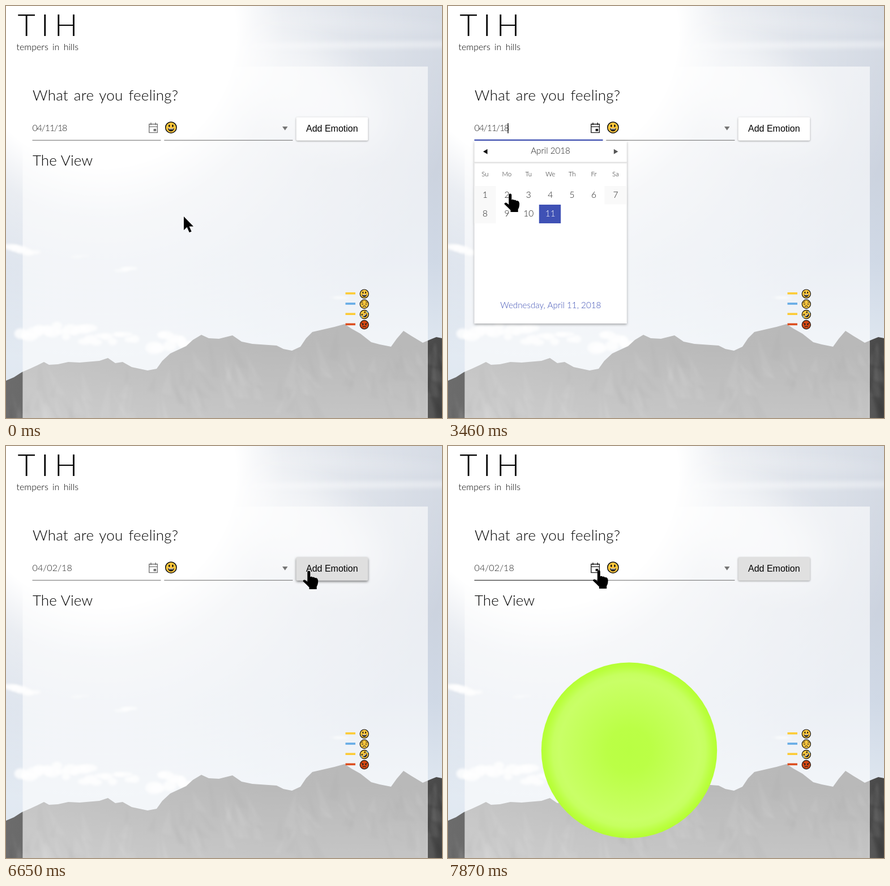
Animation of 770x728 px, one loop 8000 ms. Source, as an HTML page with a canvas:

```html
<!DOCTYPE html>
<html lang="en">
<head>
<meta charset="utf-8">
<title>Mood diary</title>
<style>
  html, body { margin: 0; width: 100%; height: 100%; overflow: hidden; background: #fff; }
  canvas, svg.ui { position: absolute; left: 0; top: 0; width: 770px; height: 728px; }
  text { font-family: Lato, sans-serif; font-weight: 300; fill: #000; }
  .mid { text-anchor: middle; }
  .sans { font-family: "Liberation Sans", Arial, sans-serif; font-weight: 400; font-size: 16px; }
  .soft { fill: #222; }
  #popup.raised { filter: drop-shadow(0 2px 2px rgba(0,0,0,.32)); }
  #btn { filter: drop-shadow(0 1.5px 1.5px rgba(0,0,0,.36)); }
  #btn.down { filter: drop-shadow(0 2px 2px rgba(0,0,0,.5)); }
</style>
</head>
<body>
<canvas id="bg" width="770" height="728"></canvas>
<svg class="ui" viewBox="0 0 770 728">
  <defs>
    <radialGradient id="lime">
      <stop offset="0" stop-color="#b9ff43"/>
      <stop offset=".25" stop-color="#bbff46"/>
      <stop offset=".8" stop-color="#c9ff67"/>
      <stop offset=".87" stop-color="#c6ff60"/>
      <stop offset=".96" stop-color="#b9ff3b"/>
      <stop offset="1" stop-color="#b5ff34"/>
    </radialGradient>
    <g id="face">
      <circle r="9.5" fill="#ffc83d" stroke="#111" stroke-width="1.5"/>
    </g>
    <g id="happy">
      <use href="#face"/>
      <ellipse cx="-3" cy="-3" rx="1.3" ry="2.2" fill="#111"/>
      <ellipse cx="3" cy="-3" rx="1.3" ry="2.2" fill="#111"/>
      <path d="M-5.4 1.4H5.4A5.4 5.2 0 0 1-5.4 1.4Z" fill="#222"/>
      <path d="M-4.2 1.8H4.2L3.6 3H-3.6Z" fill="#fff"/>
    </g>
    <g id="weary" fill="none" stroke="#222" stroke-width="1.4">
      <use href="#face"/>
      <path d="M-7-3.6L-2.5-5.5M7-3.6L2.5-5.5M-6-.8Q-4 1-2-.8M6-.8Q4 1 2-.8M-3.5 5.8Q0 1.5 3.5 5.8"/>
    </g>
    <g id="rofl" transform="rotate(-40)">
      <use href="#face"/>
      <path d="M-6-4.6L-2.6-3L-6-1.4M6-4.6L2.6-3L6-1.4" fill="none" stroke="#222" stroke-width="1.4"/>
      <path d="M-5.4 1H5.4A5.4 5.4 0 0 1-5.4 1Z" fill="#222"/>
      <path d="M-4.2 1.3H4.2L3.6 2.8H-3.6Z" fill="#fff"/>
      <path d="M-8-2L-9 2M8-2L9 2" stroke="#5bb8f0" stroke-width="2"/>
    </g>
    <g id="angry">
      <circle r="9.5" fill="#da4a14" stroke="#111" stroke-width="1.5"/>
      <path d="M-6.5-4L-1.5-1.5M6.5-4L1.5-1.5M-4 5.5Q0 2 4 5.5" fill="none" stroke="#222" stroke-width="1.6"/>
      <circle cx="-3.4" cy="0" r="1.4" fill="#222"/><circle cx="3.4" cy="0" r="1.4" fill="#222"/>
    </g>
  </defs>

  <text x="20.5" y="53" font-size="54" letter-spacing="10">TIH</text>
  <text x="18.5" y="77.5" font-size="16" word-spacing="3">tempers in hills</text>
  <text x="47" y="167" font-size="26" letter-spacing=".25" word-spacing="2.5">What are you feeling?</text>
  <text x="47" y="282" font-size="26" word-spacing="1">The View</text>

  <circle id="ball" cx="320" cy="537.8" fill="url(#lime)"/>
  <g id="legend"></g>

  <text id="date" class="soft" x="46.5" y="221" font-size="16"></text>
  <rect id="caret" y="207" width="1.4" height="18" fill="#111"/>
  <g id="icon" fill="none" stroke-width="1.4">
    <path d="M252.8 208.8H267.4V223.6H252.8ZM252.8 213.4H267.4M256 206V210.5M264.2 206V210.5"/>
    <rect class="dot" x="260.6" y="217" width="4.6" height="4.2" stroke="none"/>
  </g>
  <rect id="line1" x="46.5" width="227"/>
  <rect id="line2" x="279.3" y="236.7" width="227.2" height="1.1"/>
  <path id="drop" d="M488 213H497.5L492.75 219.8Z"/>
  <use href="#happy" transform="translate(291.4 214.7) scale(1.02)"/>

  <rect id="btn" x="512.5" y="196.5" width="126.8" height="41.2" rx="2"/>
  <text class="sans" x="530" y="222">Add Emotion</text>

  <g id="popup">
    <rect x="46.5" y="238.5" width="269.3" height="322.5" fill="#fff"/>
    <rect x="46.5" y="275.6" width="269.3" height="1.4" fill="#dcdcdc"/>
    <rect x="46.5" y="277" width="269.3" height="1.6" fill="#efefef"/>
    <rect id="title" x="84.8" y="242.5" width="192.6" height="28.5" rx="2" fill="#dededd"/>
    <path d="M69.6 252.8V261.8L62 257.3Z" fill="#111"/>
    <path d="M292.8 252.8V261.8L300.4 257.3Z" fill="#555"/>
    <text class="mid soft" x="181" y="261" font-size="15.2">April 2018</text>
    <g id="days"></g>
    <text class="mid" x="181.3" y="534" font-size="15.2" style="fill:#3f51b5">Wednesday, April 11, 2018</text>
  </g>

  <g id="tip">
    <rect x="104.5" y="364.5" width="148" height="22" fill="#fff" stroke="#808080"/>
    <text class="soft mid" x="178.5" y="380" style="font:400 13px 'Open Sans',sans-serif">Monday, April 2, 2018</text>
  </g>

  <path id="cursor"/>
</svg>

<script>
const LOOP = 8000;
const $ = id => document.getElementById(id);
const NS = 'http://www.w3.org/2000/svg';

function add(parent, tag, attrs, text) {
  const el = document.createElementNS(NS, tag);
  for (const k in attrs) el.setAttribute(k, attrs[k]);
  if (text) el.textContent = text;
  parent.appendChild(el);
  return el;
}
function set(id, attrs) {
  for (const k in attrs) $(id).setAttribute(k, attrs[k]);
}

let seed = 7;
const rnd = () => (seed = (seed * 16807) % 2147483647) / 2147483647;

// Scenery: soft sky, clouds and a ridge behind a translucent panel
function paintScene() {
  const c = $('bg').getContext('2d');
  const grad = (g, stops) => { stops.forEach(([o, col]) => g.addColorStop(o, col)); return g; };

  c.fillStyle = grad(c.createLinearGradient(0, 0, 0, 728),
    [[0, '#d3d9e3'], [.4, '#ccd3df'], [.62, '#d0d9e6'], [.85, '#e0e8f1']]);
  c.fillRect(0, 0, 770, 728);
  c.fillStyle = grad(c.createRadialGradient(170, 50, 0, 170, 50, 640),
    [[0, '#fff'], [.37, '#fff'], [.5, 'rgba(255,255,255,.58)'],
     [.7, 'rgba(255,255,255,.3)'], [1, 'rgba(255,255,255,0)']]);
  c.fillRect(0, 0, 770, 728);

  function puff(x, y, rx, ry, alpha, blur, turn = 0) {
    c.filter = `blur(${blur}px)`;
    c.fillStyle = `rgba(255,255,255,${alpha})`;
    c.beginPath();
    c.ellipse(x, y, rx, ry, turn, 0, 7);
    c.fill();
  }
  puff(640, 69, 220, 5, .5, 5, -.01);
  puff(600, 30, 190, 9, .2, 10, .05);
  puff(530, 150, 150, 70, .5, 30, .5);
  function cloud(x0, x1, y, h, n) {
    for (let i = 0; i < n; i++) {
      const u = (i + .5) / n;
      puff(x0 + (x1 - x0) * u, y + (rnd() - .5) * h, 7 + rnd() * 9, h * (.2 + rnd() * .25), .8, 2);
    }
  }
  cloud(2, 52, 432, 15, 6);
  cloud(22, 150, 575, 22, 16);
  cloud(135, 232, 587, 16, 10);
  cloud(258, 328, 594, 26, 10);
  cloud(200, 222, 467, 7, 3);
  cloud(120, 136, 443, 4, 2);
  cloud(582, 596, 514, 4, 2);
  c.filter = 'none';

  const ridge = [0,662, 14,656, 28,647, 42,641, 55,635, 67,629, 76,634, 92,633, 110,629,
    130,630, 165,627, 180,622, 193,631, 206,629, 222,638, 250,644, 266,641, 276,627, 290,614,
    318,601, 330,590, 345,581, 358,587, 376,588, 400,582, 416,593, 435,597, 478,600, 490,606,
    505,609, 520,602, 530,587, 541,576, 580,567, 598,562, 610,570, 626,579, 645,594, 660,598,
    680,602, 690,588, 702,574, 716,583, 736,595, 750,589, 760,585, 770,587];
  c.beginPath();
  c.moveTo(0, 728);
  for (let i = 0; i < ridge.length; i += 2) c.lineTo(ridge[i], ridge[i + 1]);
  c.lineTo(770, 728);
  c.fillStyle = grad(c.createLinearGradient(0, 0, 770, 0),
    [[0, '#6c6c6c'], [.3, '#5c5c5c'], [.6, '#525252'], [.95, '#505050'], [1, '#484848']]);
  c.fill();
  c.save();
  c.clip();
  c.fillStyle = grad(c.createLinearGradient(0, 600, 0, 728),
    [[0, 'rgba(255,255,255,0)'], [1, 'rgba(255,255,255,.17)']]);
  c.fillRect(29, 560, 716, 168);
  c.filter = 'blur(2px)';
  for (let i = 0; i < 120; i++) {
    const k = Math.floor(rnd() * ridge.length / 2) * 2;
    const x = ridge[k] + (rnd() - .5) * 20, y = ridge[k + 1] + rnd() * 90;
    const lean = (rnd() - .45) * 50, len = 25 + rnd() * 50;
    c.fillStyle = i % 2 ? 'rgba(0,0,0,.07)' : 'rgba(255,255,255,.06)';
    c.beginPath();
    c.moveTo(x, y);
    c.lineTo(x + lean, y + len);
    c.lineTo(x + lean + 8 + rnd() * 14, y + len + 4);
    c.fill();
  }
  c.restore();

  c.fillStyle = 'rgba(255,255,255,.6)';
  c.fillRect(29.5, 107, 715.5, 621);
}

function buildLegend() {
  [['happy', '#fccb35'], ['weary', '#66ace6'], ['rofl', '#fccb35'], ['angry', '#dc4e1e']]
    .forEach(([face, color], i) => {
      const y = 508 + i * 18.2;
      add($('legend'), 'rect', { x: 599.5, y: y - 2, width: 17.5, height: 3.6, fill: color });
      const g = add($('legend'), 'g', { transform: `translate(632.8 ${y + .6}) scale(.8)` });
      add(g, 'use', { href: '#' + face });
    });
}

function buildDays() {
  const box = $('days'), mid = i => 65.5 + i * 38.4;
  const cell = (x, y, w, h, fill) => add(box, 'rect', { x, y, width: w, height: h, fill });
  cell(46.5, 318, 38, 66, '#f9f9f9');
  cell(276.5, 318, 39.3, 32.5, '#f9f9f9');
  cell(160.8, 351, 38.4, 33, '#3f51b5');
  ['Su', 'Mo', 'Tu', 'We', 'Th', 'Fr', 'Sa'].forEach((d, i) =>
    add(box, 'text', { class: 'mid soft', x: mid(i), y: 301, 'font-size': 11.5 }, d));
  for (let d = 1; d <= 11; d++) {
    const i = d - 1, t = add(box, 'text', {
      class: 'mid soft', x: mid(i % 7), y: i < 7 ? 339 : 372, 'font-size': 15.5
    }, String(d));
    if (d === 11) t.style.fill = '#fff';
  }
}

const SHAPES = {
  arrow: 'M0 0V24L5.6 18.8L9.8 28L13.6 26.4L9.6 17.4H17Z',
  hand: 'M7.8 2.2Q8 0 10.3 0T12.8 2.2V11Q15 9.4 17 11.4Q19.6 10.4 21.2 12.7Q24.2 12 25.7 14.2' +
        'Q27 16.4 26.5 21Q26.2 25 24.2 28V32.4H11V29.2Q6.4 24.4 0 18.4Q0 15 3.8 16.2L7.8 19.4Z'
};

// [time, cursor, x, y, changes]; changes last until they are set again
const STEPS = [
  [0, 'arrow', 314, 372, { field: 0, drop: 0, caret: 0, pop: 0, hover: 0, tip: 0, date: '04/11/18', btn: '#fff', r: 0 }],
  [290, 'arrow', 259, 259, {}],
  [610, 'hand', 248, 227, { field: 1 }],
  [940, 'hand', 246, 224, {}],
  [1560, 'hand', 246, 224, { field: 2, pop: 1, caret: 1 }],
  [1870, 'hand', 246, 224, { pop: 2, caret: 0 }],
  [2520, 'hand', 179, 265.5, { hover: 1, caret: 1 }],
  [2830, 'hand', 162, 306, { hover: 0 }],
  [3140, 'hand', 108, 329, { caret: 0 }],
  [3460, 'hand', 99.5, 331.5, { caret: 1 }],
  [3790, 'hand', 95, 332, { tip: .5 }],
  [4140, 'hand', 95, 332, { tip: 1 }],
  [4510, 'arrow', 104, 332, { pop: 0, tip: 0, date: '04/02/18' }],
  [4740, 'arrow', 234, 237, { caret: 0 }],
  [5060, 'hand', 370.5, 229, { drop: 1 }],
  [5380, 'hand', 464, 221, { caret: 1 }],
  [5700, 'hand', 524.5, 221, { drop: 0, btn: '#fafafa' }],
  [6010, 'hand', 524.5, 220.5, { caret: 0 }],
  [6330, 'hand', 524.5, 220.5, { caret: 1 }],
  [6650, 'hand', 524.5, 220.5, { caret: 0, field: 0, btn: '#dfdfdf', down: 1 }],
  [6960, 'hand', 524.5, 220.5, { r: 175.7 }],
  [7260, 'arrow', 440, 246, { r: 150, btn: '#e0e0e0', down: 0 }],
  [7570, 'hand', 350, 227, { r: 155.2, drop: 1 }],
  [7870, 'hand', 256, 219.5, { field: 1, drop: 0 }]
];
let carry = { down: 0 };
const POSES = STEPS.map(([at, shape, x, y, change]) => {
  carry = { ...carry, ...change };
  return { at, shape, x, y, ...carry };
});

const show = (id, on) => { $(id).style.display = on ? '' : 'none'; };
const tone = on => on ? '#1c1c1c' : '#757575';

function apply(p) {
  const late = p.date === '04/02/18';
  $('date').textContent = p.date;
  set('date', { 'letter-spacing': late ? .1 : -1.1 });
  set('caret', { x: late ? 115 : 105.3 });
  show('caret', p.caret);

  const focus = p.field === 2;
  set('line1', { y: focus ? 235.8 : 236.7, height: focus ? 2.2 : 1.1, fill: focus ? '#3f51b5' : tone(p.field) });
  set('icon', { stroke: tone(p.field) });
  document.querySelector('.dot').setAttribute('fill', tone(p.field));
  set('line2', { fill: tone(p.drop) });
  set('drop', { fill: tone(p.drop) });

  set('btn', { fill: p.btn, class: p.down ? 'down' : '' });
  show('popup', p.pop);
  set('popup', { class: p.pop > 1 ? 'raised' : '' });
  show('title', p.hover);
  set('tip', { opacity: p.tip });
  set('ball', { r: p.r });
  set('cursor', { d: SHAPES[p.shape], transform: `translate(${p.x} ${p.y})` });
}

let shown = null;
function frame() {
  const t = performance.now() % LOOP;
  const pose = POSES.findLast(p => p.at <= t);
  if (pose !== shown) apply(shown = pose);
  requestAnimationFrame(frame);
}

paintScene();
buildLegend();
buildDays();
frame();
</script>
</body>
</html>
```
